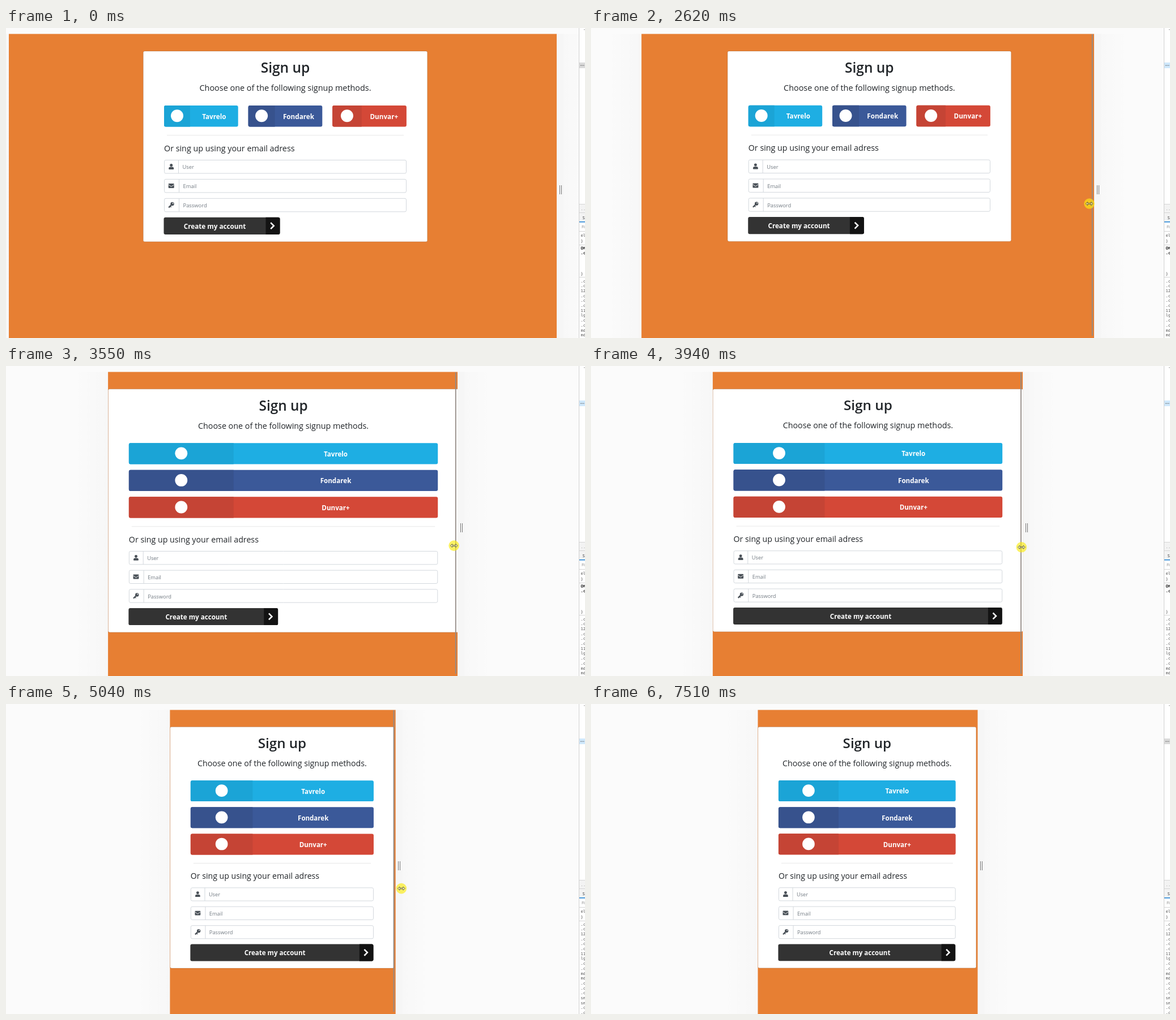
Write an HTML page with a canvas that moves like this. It is 1022 px wide and 548 px high and loops after 7610 ms.

```html
<!DOCTYPE html>
<html lang="en">
<head>
<meta charset="utf-8">
<title>Responsive sign-up form</title>
<style>
html, body { margin: 0; width: 100%; height: 100%; overflow: hidden; background: #fbfbfb; }
canvas { display: block; }
</style>
</head>
<body>
<canvas id="stage" width="1022" height="548"></canvas>
<script>
const ctx = document.getElementById('stage').getContext('2d');
const LOOP = 7610, TOP = 10.5, HEIGHT = 548, PAD = 37;
const WIDE_LEFT = 5, NARROW_LEFT = 294.5, MIRROR = 977.2;
const DRAG_START = 1760, DRAG_END = 5270;
const SANS = '"Open Sans", "Noto Sans", sans-serif';
const MONO = '"DejaVu Sans Mono", monospace';

// Time and left edge of the page at the turns of the drag
const dragKeys = [[DRAG_START, WIDE_LEFT], [1860, 7], [2620, 89], [3550, 180],
  [4340, 250.5], [4710, 282], [DRAG_END, NARROW_LEFT]];

const services = [
  { name: 'Tavrelo', color: '#1eaee3', dark: '#1ba4d6', iconWidth: 46 },
  { name: 'Fondarek', color: '#3b5999', dark: '#37528d', iconWidth: 47 },
  { name: 'Dunvar+', color: '#d44837', dark: '#c54435', iconWidth: 51.5 }
];

const progress = (t, start, end) => Math.min(1, Math.max(0, (t - start) / (end - start)));
const mix = (a, b, k) => a + (b - a) * k;
const easeOut = k => k * (2 - k);
const easeInOut = k => k * k * (3 - 2 * k);
const curve = (a, b, c, k) => a.map((v, i) => mix(mix(v, b[i], k), mix(b[i], c[i], k), k));

function pageLeft(t) {
  const i = dragKeys.findIndex(([time]) => time > t);
  if (i < 0) return NARROW_LEFT;
  if (i === 0) return WIDE_LEFT;
  const [t0, x0] = dragKeys[i - 1], [t1, x1] = dragKeys[i];
  return mix(x0, x1, progress(t, t0, t1));
}

function pointerAt(t, left) {
  if (t < DRAG_START) {
    return curve([1003, 530], [984, 340], [974, 304], easeOut(progress(t, 70, 780)));
  }
  if (t < DRAG_END) {
    const p = (left - WIDE_LEFT) / (NARROW_LEFT - WIDE_LEFT);
    const lag = 2 + 13 * (Math.sin(Math.PI * p) - p);
    return [MIRROR - left - lag, 304 + 22.5 * p];
  }
  if (t < 6000) {
    return curve([692, 327], [830, 200], [965, 77.5], easeInOut(progress(t, DRAG_END, 5960)));
  }
  return curve([965, 77.5], [1090, 20], [877, 550], easeOut(progress(t, 6000, 7190)));
}

function rect(x, y, w, h, color) {
  ctx.fillStyle = color;
  ctx.fillRect(x, y, w, h);
}

function box(x, y, w, h, radius, fill, stroke) {
  ctx.beginPath();
  ctx.roundRect(x, y, w, h, radius);
  ctx.fillStyle = fill;
  ctx.fill();
  if (stroke) {
    ctx.strokeStyle = stroke;
    ctx.lineWidth = 1;
    ctx.stroke();
  }
}

function disc(x, y, r, color) {
  ctx.fillStyle = color;
  ctx.beginPath();
  ctx.arc(x, y, r, 0, Math.PI * 2);
  ctx.fill();
}

function line(points, color, width) {
  ctx.beginPath();
  points.forEach(([x, y]) => ctx.lineTo(x, y));
  ctx.strokeStyle = color;
  ctx.lineWidth = width;
  ctx.stroke();
}

function text(str, x, y, font, color, align = 'left') {
  ctx.font = font;
  ctx.fillStyle = color;
  ctx.textAlign = align;
  ctx.fillText(str, x, y);
}

const fieldIcons = {
  User(x, y) {
    disc(x, y - 2.5, 2.5, '#495057');
    box(x - 4.5, y + 0.5, 9, 4.5, [3, 3, 1, 1], '#495057');
  },
  Email(x, y) {
    box(x - 5, y - 4, 10, 8, 1, '#495057');
    line([[x - 5, y - 2], [x, y + 1.5], [x + 5, y - 2]], '#fff', 0.9);
  },
  Password(x, y) {
    line([[x - 4.5, y + 4.5], [x + 1, y - 1]], '#495057', 2.4);
    line([[x - 2.5, y + 1.5], [x, y + 4]], '#495057', 1.4);
    disc(x + 1.8, y - 1.8, 3.2, '#495057');
    disc(x + 2.8, y - 2.8, 0.9, '#fff');
  }
};

function drawServices(left, width, stacked) {
  services.forEach(({ name, color, dark, iconWidth }, i) => {
    const x = left + (stacked ? 0 : i * 148.6);
    const y = 137 + (stacked ? i * 47.85 : 0);
    const w = stacked ? width : 130.7;
    const split = stacked ? w * 0.339 : iconWidth;
    box(x, y, w, 37.5, 3, color);
    box(x, y, split, 37.5, [3, 0, 0, 3], dark);
    disc(x + split / 2, y + 18.3, 11, '#fff');
    text(name, x + (split + w) / 2, y + 23.7, `700 11.7px ${SANS}`, '#fff', 'center');
  });
}

function drawField(label, index, left, width) {
  const y = 233.5 + index * 33.9, split = index ? 26 : 25;
  box(left + 0.5, y, width - 1, 23.5, 2.5, '#fff', '#d3d8dd');
  line([[left + split + 0.5, y], [left + split + 0.5, y + 23.5]], '#d3d8dd', 1);
  fieldIcons[label](left + 12.7, y + 11.5);
  text(label, left + split + 7.5, y + 15.8, `9.4px ${SANS}`, '#737b83');
}

function drawForm(left, width, narrow) {
  text('Or sing up using your email adress', left, 217.8, `14.3px ${SANS}`, '#212529');
  Object.keys(fieldIcons).forEach((label, i) => drawField(label, i, left, width));
  const x = left - 0.5, w = narrow ? width : width / 2 - 9;
  box(x, 334.7, w, 30.3, 3, '#333');
  box(x + w - 25, 334.7, 25, 30.3, [0, 3, 3, 0], '#131313');
  text('Create my account', x + (w - 25) / 2, 354.9, `700 11.7px ${SANS}`, '#fff', 'center');
  const c = x + w - 13;
  line([[c - 3.3, 344.2], [c + 2.2, 349.7], [c - 3.3, 355.2]], '#fff', 2.6);
}

function drawPage(left) {
  const pageWidth = MIRROR - 2 * left;
  const shrink = (left - WIDE_LEFT) / (NARROW_LEFT - WIDE_LEFT);
  const scale = 1 - 0.015 * shrink ** 1.7;
  const center = mix(493, 487.3, shrink);
  const stacked = pageWidth < 742, narrow = pageWidth < 570;

  rect(left, TOP, pageWidth, HEIGHT, '#e77f33');
  ctx.save();
  ctx.beginPath();
  ctx.rect(left, TOP, pageWidth, HEIGHT);
  ctx.clip();
  ctx.translate(center, 10);
  ctx.scale(scale, scale);
  ctx.translate(0, -10);

  const half = stacked ? (center - left) / scale : 251;
  const inner = PAD - half, width = -2 * inner, extra = stacked ? 96 : 0;
  box(-half + 0.3, 41, half * 2 - 0.6, 336.8 + extra, 2.5, '#fff', 'rgba(0,0,0,.14)');
  text('Sign up', 0, 79, `600 24.5px ${SANS}`, '#212529', 'center');
  text('Choose one of the following signup methods.', 0, 111.3, `14.4px ${SANS}`, '#212529', 'center');
  drawServices(inner, width, stacked);
  ctx.translate(0, extra);
  rect(inner + 5, 189, width - 10, 1, '#e8e8e8');
  drawForm(inner, width, narrow);
  ctx.restore();
}

function drawBackdrop(left) {
  rect(0, 0, 1022, HEIGHT, '#fbfbfb');
  const right = MIRROR - left;
  for (const [edge, far] of [[left, left - 60], [right, right + 60]]) {
    const shade = ctx.createLinearGradient(edge, 0, far, 0);
    shade.addColorStop(0, 'rgba(0,0,0,.015)');
    shade.addColorStop(1, 'rgba(0,0,0,0)');
    rect(Math.min(edge, far), TOP, 60, HEIGHT, shade);
  }
}

function drawGutter(left, t) {
  const right = MIRROR - left;
  const hover = t < 2100 ? progress(t, 770, 1060) : 0;
  const gray = Math.round(mix(246, 217, hover));
  rect(right, TOP, 12, HEIGHT, `rgb(${gray},${gray},${gray})`);
  const grip = Math.round(right + 4.5);
  rect(grip, 278, 1, 16, '#777');
  rect(grip + 3, 278, 1, 16, '#777');
  if (t >= DRAG_START && t < DRAG_END) rect(right - 4.2, 11, 1.8, 533, '#938b85');
}

function drawInspector(t, small) {
  rect(1011, 0, 11, HEIGHT, '#fff');
  rect(1011, 0, 1, HEIGHT, '#d0d0d0');
  rect(1012, 61, 10, 10, t >= 1610 && t < 7510 ? '#cfe8fc' : '#dadada');
  for (let x = 1014; x < 1020; x += 2.5) rect(x, 65.5, 1.3, 1.3, '#666');
  rect(1020, 2, 1.5, 1.5, '#aaa');
  rect(1012, 311, 10, 32, '#f3f3f3');
  [311, 326, 359, 383].forEach(y => rect(1012, y, 10, 1, '#d5d5d5'));
  rect(1012, 342, 10, 1.5, '#1a7fd4');

  const code = (str, y, color = '#555', weight = 400) =>
    text(str, 1014.5, y + 2.5, `${weight} 7px ${MONO}`, color);
  code('..', 319, '#999');
  text('S', 1017.5, 338, `7.5px ${SANS}`, '#333');
  text('Fi', 1016, 354, `7.5px ${SANS}`, '#888');
  code('el', 366);
  code('}', 376);
  if (!small) {
    code('@m', 388, '#222', 700);
    code('.c', 397, '#222', 700);
    code('}', 434);
    rect(1012, 440, 10, 1, '#d5d5d5');
  }
  const rules = '.c .c 12 .c .c .c 11 lg .c .c md md .c .c .c sm sm .c .c'.split(' ');
  rules.forEach((rule, i) => code(rule, (small ? 389 : 447) + i * 8.7));
}

function polygon(points) {
  ctx.beginPath();
  points.forEach(([x, y]) => ctx.lineTo(x, y));
  ctx.closePath();
  ctx.fill();
  ctx.stroke();
}

function drawPointer(t, left) {
  if (t < 70 || t >= 7190) return;
  const [x, y] = pointerAt(t, left);
  if (t >= 1610 && t < DRAG_END) disc(x, y, 9.3, 'rgba(250,236,20,.66)');
  ctx.save();
  ctx.translate(x, y);
  ctx.strokeStyle = '#444';
  ctx.lineWidth = 0.8;
  if (t < 640 || t >= DRAG_END) {
    ctx.fillStyle = '#fff';
    polygon([[0, 0], [0, 10.5], [2.4, 8.3], [4, 11.8], [5.5, 11], [4, 7.7], [6.8, 7.4]]);
  } else {
    ctx.fillStyle = 'rgba(255,255,255,.45)';
    polygon([[-6.5, 0], [-3, -3], [-3, -0.9], [3, -0.9], [3, -3], [6.5, 0],
      [3, 3], [3, 0.9], [-3, 0.9], [-3, 3]]);
  }
  ctx.restore();
}

function draw(now) {
  const t = now % LOOP, left = pageLeft(t);
  drawBackdrop(left);
  drawPage(left);
  drawGutter(left, t);
  drawInspector(t, left > 270);
  drawPointer(t, left);
  requestAnimationFrame(draw);
}
requestAnimationFrame(draw);
</script>
</body>
</html>
```
